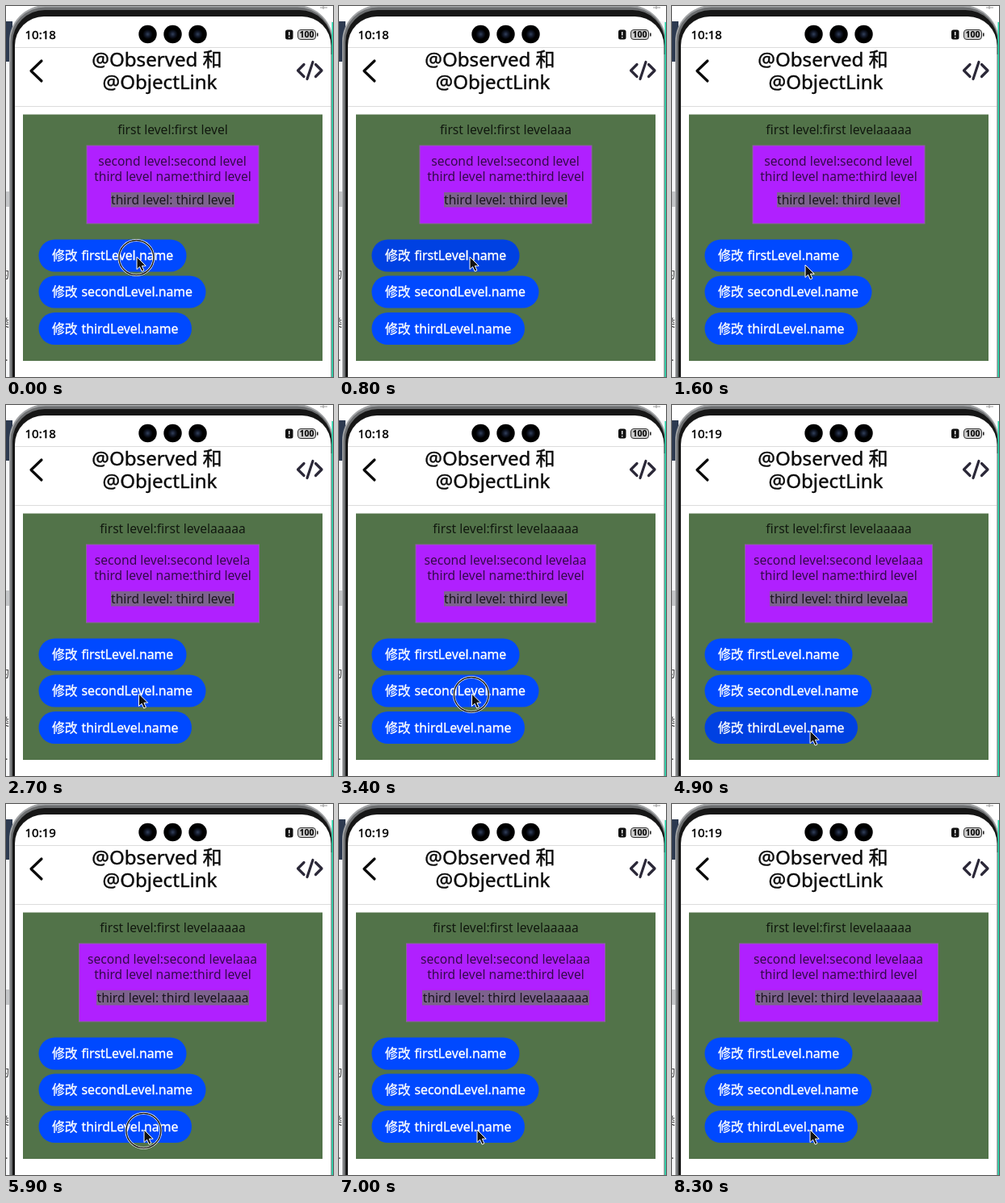
An HTML page for the animation above (8400 ms loop, 405 by 460 pixels).

```html
<!DOCTYPE html>
<html lang="zh">
<head>
<meta charset="utf-8">
<style>
  html, body { margin: 0; width: 100%; height: 100%; overflow: hidden; background: #f6f7f8; }
  svg { display: block; width: 405px; height: 460px; font-family: "Noto Sans", "Noto Sans CJK SC", "Noto Sans CJK", sans-serif; }
  text { white-space: pre; }
  .title { font-size: 24.1px; fill: #0a0a0a; stroke: #0a0a0a; stroke-width: .4px; }
  .level { font-size: 15.6px; fill: #000; fill-opacity: .8; }
  .inner { fill-opacity: .7; }
  .title, .level { text-anchor: middle; }
  .button { font-size: 15.8px; word-spacing: .8px; fill: #fff; stroke: #fff; stroke-width: .35px; }
  .icon { fill: none; stroke-linecap: round; stroke-linejoin: round; }
</style>
</head>
<body>
<svg viewBox="0 0 405 460">
  <defs>
    <radialGradient id="lens">
      <stop offset="0" stop-color="#33415c"/>
      <stop offset=".3" stop-color="#111726"/>
      <stop offset=".55" stop-color="#000"/>
    </radialGradient>
  </defs>

  <!-- desktop behind the phone -->
  <rect width="405" height="19" fill="#fff"/>
  <rect y="19" width="8" height="50" fill="#2d3a50"/>
  <rect y="230" width="4" height="19" fill="#c4c6c8"/>
  <g font-size="13" fill="#333">
    <text x="-9" y="337">的</text>
    <text x="-9" y="397">类</text>
    <text x="-1" y="440">.</text>
  </g>
  <path d="M389 2h9M393 0v4" stroke="#999"/>

  <!-- phone -->
  <rect x="4" y="-1" width="401" height="520" rx="45" fill="#a3a5a7"/>
  <rect x="5.5" y="1.5" width="398.5" height="520" rx="43" fill="#6c6e70"/>
  <rect x="8" y="5" width="395.5" height="520" rx="40" fill="#161616"/>
  <rect x="11" y="13" width="391.5" height="520" rx="36" fill="#fff"/>
  <path d="M403 60V460" stroke="#c9cfcf"/>
  <path d="M404.300 20V460" stroke="#1fdcae" stroke-width="1.500"/>

  <!-- status bar -->
  <text id="clock" x="23.500" y="40.500" font-size="15" stroke="#000" stroke-width=".45"></text>
  <g fill="url(#lens)">
    <circle cx="175.500" cy="35" r="11.200"/>
    <circle cx="206.500" cy="35" r="11.200"/>
    <circle cx="237.500" cy="35" r="11.200"/>
  </g>
  <rect x="346" y="29.500" width="9.500" height="12" rx="2.500" fill="#111"/>
  <path d="M350.700 32v4.500M350.700 38v1.500" stroke="#fff" stroke-width="1.400"/>
  <rect x="361.500" y="29.500" width="22" height="12" rx="3.500" fill="#ccc" stroke="#333"/>
  <path d="M385.800 33.500v4" stroke="#222" stroke-width="1.600"/>
  <text x="372.500" y="39.300" font-size="10.500" font-weight="700" text-anchor="middle">100</text>

  <!-- header -->
  <path d="M11 51.500H402M11 124.500H402" stroke="#dcdcdc"/>
  <path class="icon" d="M44 68 31 80.500 44 93" stroke="#0a0a0a" stroke-width="3.200"/>
  <path class="icon" d="M369 72.500 361.500 80 369 87.500M380 69.500 373 90.500M383.500 72.500 391 80 383.500 87.500" stroke="#2b2838" stroke-width="3.200"/>
  <text class="title" x="187" y="75">@Observed 和</text>
  <text class="title" x="190.500" y="103">@ObjectLink</text>

  <!-- panel -->
  <rect x="21" y="134.500" width="371" height="305.500" fill="#527349"/>
  <text id="first" class="level" x="206.500" y="159.300"></text>
  <rect id="box" y="173" height="96.800" fill="#b020ff" stroke="#8c62a0"/>
  <text id="second" class="level inner" x="206" y="198"></text>
  <text class="level inner" x="206.500" y="217">third level name:third level</text>
  <rect id="mark" y="231" height="18.500" fill="#7d628e"/>
  <text id="third" class="level" x="206.500" y="245.700"></text>
  <g id="buttons"></g>

  <!-- pointer -->
  <g id="pointer">
    <g id="ring" fill="none" transform="translate(-.6 1)">
      <circle r="21.500" stroke="#fff" stroke-width="2.800"/>
      <circle r="21.500" stroke="#111" stroke-width="1.400"/>
    </g>
    <path d="M0 0V15.500L3.600 12.200 6.200 18 8.900 16.800 6.400 11.200H11.200Z" fill="#111" stroke="#fff"/>
  </g>
</svg>
<script>
const $ = id => document.getElementById(id);
const LOOP = 8400, CENTER = 206.5;

// Phases after each press: the ring shows, the button darkens, the text updates
const RING_TIME = 180, UPDATE_DELAY = 250, RELEASE_DELAY = 400;

const presses = {
  first: [0, 270, 540, 810, 1080],
  second: [2200, 2800, 3400],
  third: [4200, 4625, 5050, 5475, 5900, 6325]
};

// Pointer moves: start, end, target x, target y
const moves = [
  [1250, 1550, 165, 321],
  [1650, 2050, 164.5, 358],
  [3750, 4100, 171, 404]
];

$('buttons').innerHTML = [['first', 289.5, 183], ['second', 334.5, 207], ['third', 380, 189.5]]
  .map(([name, y, width]) =>
    `<rect id="${name}Button" x="40.5" y="${y}" width="${width}" height="40" rx="20"/>
     <text class="button" x="57" y="${y + 25.7}">修改 ${name}Level.name</text>`).join('');

const ease = p => p * p * (3 - 2 * p);

function pointerAt(t) {
  let x = 162, y = 311;
  for (const [start, end, toX, toY] of moves) {
    const p = ease(Math.min(1, Math.max(0, (t - start) / (end - start))));
    x += (toX - x) * p;
    y += (toY - y) * p;
  }
  return [x, y];
}

function setWidth(rect, width) {
  rect.setAttribute('x', CENTER - width / 2);
  rect.setAttribute('width', width);
}

function draw(t) {
  const count = name => presses[name].filter(p => t >= p + UPDATE_DELAY).length;
  const within = (name, from, to) => presses[name].some(p => t >= p + from && t < p + to);
  const names = Object.keys(presses);
  const second = count('second'), third = count('third');

  $('first').textContent = 'first level:first level' + 'a'.repeat(count('first'));
  $('second').textContent = 'second level:second level' + 'a'.repeat(second);
  $('third').textContent = 'third level: third level' + 'a'.repeat(third);
  setWidth($('box'), Math.max(213, 205 + 9 * second, 192 + 9 * third));
  setWidth($('mark'), 153 + 9 * third);
  $('clock').textContent = t < 4000 ? '10:18' : '10:19';

  for (const name of names) {
    const dark = within(name, RING_TIME, RELEASE_DELAY);
    $(name + 'Button').setAttribute('fill', dark ? '#0041e2' : '#0049ff');
  }
  const ringing = names.some(name => within(name, 0, RING_TIME));
  $('ring').setAttribute('visibility', ringing ? 'visible' : 'hidden');
  $('pointer').setAttribute('transform', `translate(${pointerAt(t)})`);
}

const begin = performance.now();
function frame() {
  draw((performance.now() - begin) % LOOP);
  requestAnimationFrame(frame);
}
frame();
</script>
</body>
</html>
```
